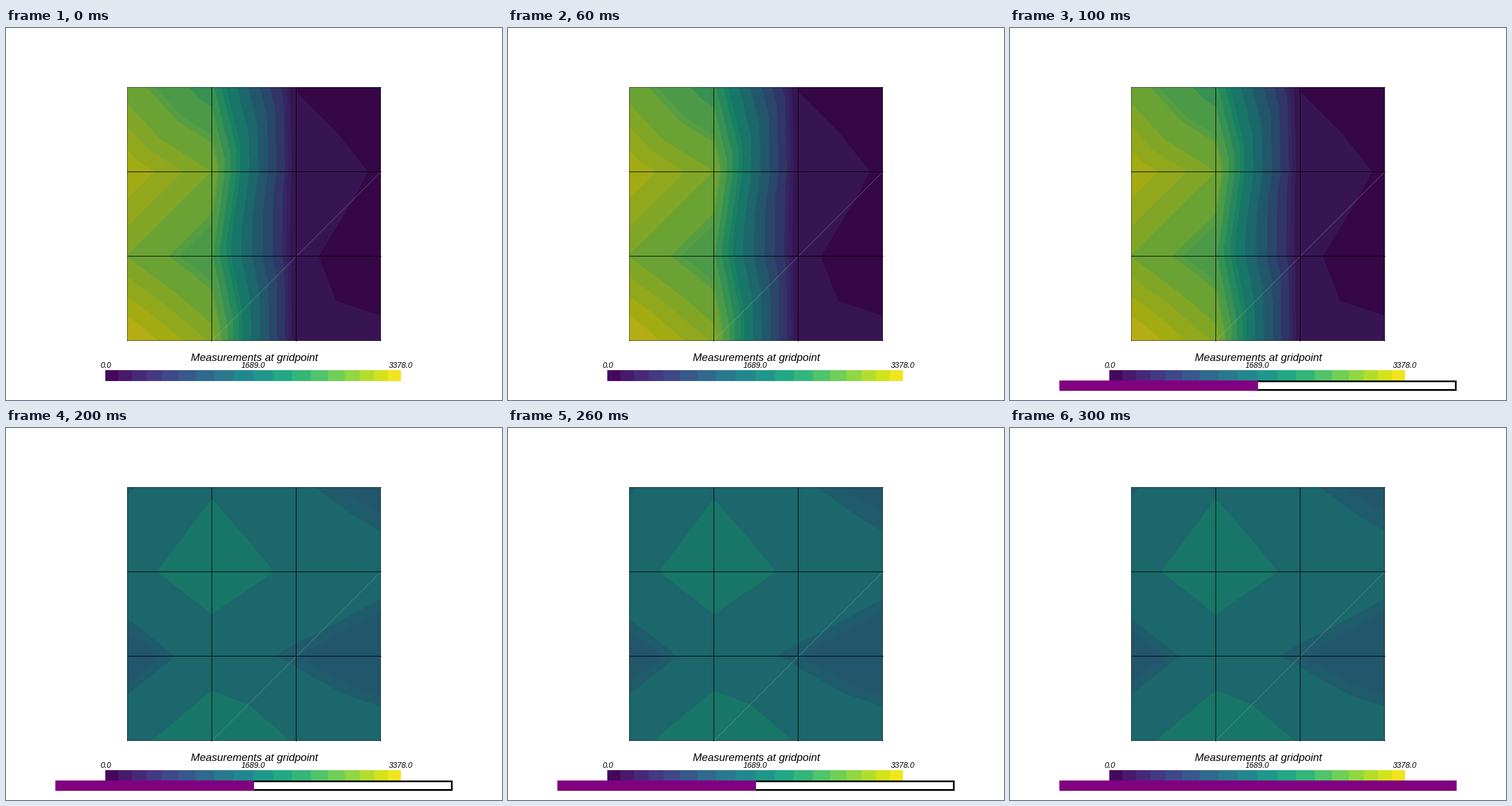
A matplotlib script for the animation above (400 ms loop, 864 by 648 pixels).

```python
import numpy as np
import matplotlib.pyplot as plt
from matplotlib.animation import FuncAnimation
from matplotlib.patches import Rectangle
from matplotlib.tri import Triangulation

W, H, DPI = 864, 648, 100
PX = 72 / DPI
X0, Y0, SIDE = 211, 103, 442
PEAK = 3378
PURPLE = (.5, 0, .5)

fig = plt.figure(figsize=(W / DPI, H / DPI), dpi=DPI, facecolor="white")
ax = fig.add_axes([0, 0, 1, 1])
ax.set_xlim(0, W)
ax.set_ylim(H, 0)
ax.axis("off")


def block(x, y, w, h, color, z):
    return ax.add_patch(Rectangle((x, y), w, h, fc=color, lw=0,
                                  antialiased=False, zorder=z))


def label(x, y, text, size):
    ax.text(x, y, text, fontsize=size * PX, family="Liberation Sans",
            style="italic", ha="center", va="baseline", zorder=5)


# 4 x 4 grid of points, every cell cut from lower left to upper right
rows, cols = np.indices((4, 4))
starts = [4 * r + c for r in range(3) for c in range(3)]
tris = [t for k in starts for t in ((k, k + 1, k + 4), (k + 1, k + 5, k + 4))]
mesh = Triangulation(X0 + SIDE / 3 * cols.ravel(),
                     Y0 + SIDE / 3 * rows.ravel(), tris)

# Band limits as shares of the peak; the light dims the colour map
levels = np.r_[0, .035, .095, .13, .16, .238, .318, .397, .41, .494, .578,
               np.linspace(.616, .778, 4), .792, np.linspace(.847, .985, 5), 1]
shades = plt.cm.viridis(levels[:-1] + .7 * np.diff(levels))[:, :3] * .755


def surface(values):
    return ax.tricontourf(mesh, np.ravel(values), levels=levels,
                          colors=[tuple(s) for s in shades], zorder=1)


first = surface([[.822, .686, .034, .017],
                 [.948, .846, .051, .032],
                 [.845, .735, .041, .018],
                 [.994, .875, .050, .042]])
second = surface(.494 + .05 * np.array([[-1.84, -.17, -1.5, -2.33],
                                        [-.56, 1, -.37, -1.1],
                                        [-2.6, -1, -1.93, -2.95],
                                        [-.6, 1.44, -.11, -.83]]))

# Mesh edges
for i in range(4):
    style = dict(color="black", lw=PX, alpha=1 if i in (1, 2) else .55,
                 zorder=3)
    ax.plot([X0 + 147 * i] * 2, [Y0, Y0 + SIDE], **style)
    ax.plot([X0, X0 + SIDE], [Y0 + 147 * i] * 2, **style)
ax.plot([X0 + SIDE / 3, X0 + SIDE], [Y0 + SIDE, Y0 + SIDE / 3],
        color="0.8", lw=.7 * PX, alpha=.4, zorder=2)

# Colour scale: bands are widest in the middle
t = np.linspace(0, 1, 19)
edges = t - np.sin(2 * np.pi * t) / (10 * np.pi)
for a, b in zip(edges, edges[1:]):
    block(173 + 515 * a, 596, 515 * (b - a), 19,
          plt.cm.viridis((a + b) / 2), 4)

label(432.5, 580, "Measurements at gridpoint", 18.8)
for share in (0, .5, 1):
    label(173.5 + 514.5 * share, 591.5, f"{PEAK * share:.1f}", 13.6)

# Progress bar
BAR = 692
bar = [block(86, 614, BAR, 18, "black", 6),
       block(88, 617, BAR - 5, 12, "white", 7),
       block(86, 614, 0, 18, PURPLE, 8)]


def update(i):
    first.set_visible(i < 2)
    second.set_visible(i >= 2)
    for part in bar:
        part.set_visible(i > 0)
    bar[-1].set_width(BAR * ((i + 1) // 2) / 2)
    return first, second, *bar


anim = FuncAnimation(fig, update, frames=4, interval=100, repeat=True,
                     repeat_delay=0, init_func=lambda: update(0), blit=False)
plt.show()
```
